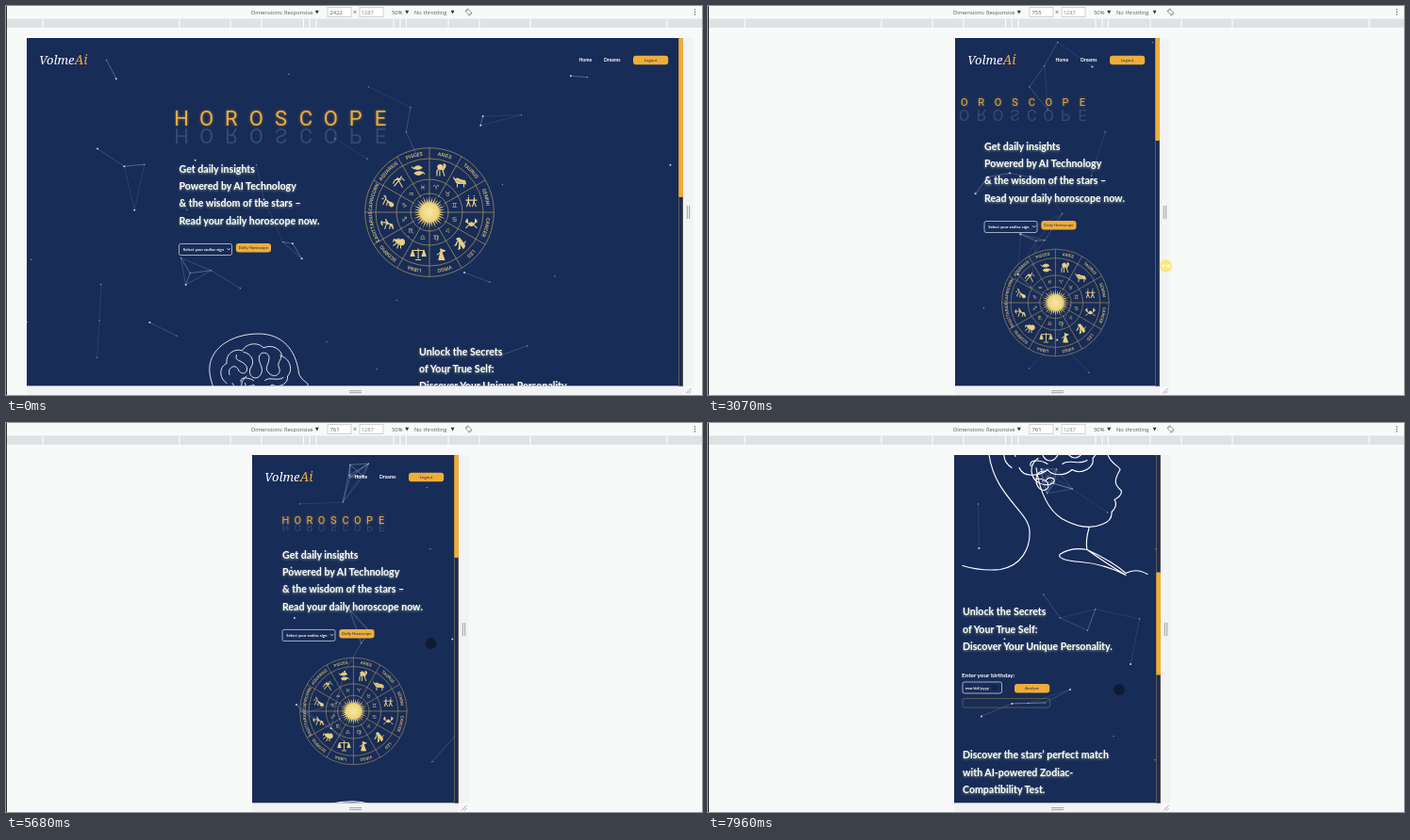
An HTML page that plays this animation: 738x413 px, repeating every 8000 ms.

```html
<!DOCTYPE html>
<html lang="en">
<head>
<meta charset="utf-8">
<title>Responsive horoscope page</title>
<style>
html, body { margin: 0; width: 100%; height: 100%; overflow: hidden; background: #f8faf9; }
svg { display: block; width: 738px; height: 413px; }
text { font-family: Lato, sans-serif; white-space: pre; }
.ui text { font-family: "Open Sans", sans-serif; fill: #55595e; }
.caps { font-family: Roboto, sans-serif; }
.glow { filter: drop-shadow(.6px 1.2px 1.1px rgba(225, 240, 170, .55)); }
.gold { filter: drop-shadow(0 0 1.5px rgba(240, 173, 53, .5)); }
.line { fill: none; stroke: #fff; stroke-linecap: round; stroke-linejoin: round; }
</style>
</head>
<body>
<svg id="stage" viewBox="0 0 738 413"></svg>
<script>
const LOOP = 8000, STEP = LOOP / 120, SCALE = 0.2874, MID = 370.4, TOP = 34, TALL = 369.6;
const NAVY = '#182c58', GOLD = '#efad38';

const lerp = (a, b, k) => a + (b - a) * k;
const clamp = v => Math.max(0, Math.min(1, v));
const range = (n, f) => Array.from({ length: n }, (_, i) => f(i));

// Piecewise linear track through [time, value] pairs
const track = (...keys) => t => {
  const i = keys.findIndex(k => k[0] > t);
  if (i === 0) return keys[0][1];
  if (i < 0) return keys[keys.length - 1][1];
  const [a, b] = [keys[i - 1], keys[i]];
  return lerp(a[1], b[1], (t - a[0]) / (b[0] - a[0]));
};

const width = track([0, 2422], [867, 2422], [1066, 2124], [1733, 1492], [2133, 803], [2600, 768], [3066, 755], [3400, 761]);
const lag = track([867, 0], [1066, 4.3], [1800, 3], [2133, 0]);
const scroll = track([6300, 0], [6400, 12], [6900, 200], [7400, 380], [7800, 423]);
const heroY = track([2600, 160], [3066, 149], [4866, 141.5], [6400, 138.5]);
const pitch = track([2600, 23], [3066, 17.9], [4866, 13.75], [6400, 11.75]);
const endX = track([3066, 397], [6400, 398.5]);
const titleSize = track([2600, 18], [3066, 11]);
const titleY = track([2600, 110], [3066, 102.5], [6400, 103]);
const echoY = track([2600, 128], [3066, 116.5], [4866, 113], [6400, 110]);
const echoSize = track([2600, 21], [3066, 17], [4866, 12], [6400, 10]);
const cursorX = track([350, 668], [750, 725], [867, 724], [1066, 659], [1733, 570], [2133, 477], [2600, 480], [3066, 485.5], [3500, 485.5], [4250, 479.5], [5200, 479.5], [5900, 436]);
const cursorY = track([350, 285], [750, 224], [1066, 235], [2133, 275], [3066, 276], [3500, 274], [4250, 136], [5200, 136], [5900, 283]);

const text = (x, y, s, size, more = '') =>
  `<text x="${x}" y="${y + size * 0.35}" font-size="${size}" ${more}>${s}</text>`;
const bold = (x, y, s, size, more = '') => text(x, y, s, size, 'font-weight="700" fill="#fff" ' + more);
const lines = (rows, y = 0) => rows.map((s, i) => bold(0, y + i * 18.35, s, 10.6)).join('');
const button = (x, y, label, size = 4.4) =>
  `<rect x="${x}" y="${y}" width="37.2" height="9.5" rx="3" fill="${GOLD}"/>` +
  text(x + 18.6, y + 4.7, label, size, `text-anchor="middle" fill="${NAVY}"`);
const field = (x, y, w, h, color) =>
  `<rect x="${x}" y="${y}" width="${w}" height="${h}" rx="2" fill="none" stroke="${color}" stroke-width=".7"/>`;
const caret = x => `<path d="M${x} 4.8h4l-2 3.6z" fill="#333"/>`;

const SIGNS = 'ARIES TAURUS GEMINI CANCER LEO VIRGO LIBRA SCORPIO SAGITTARIUS CAPRICORN AQUARIUS PISCES'.split(' ');
const FIGURES = [
  'M-4 6V1Q-4-1-1-1H2Q3-5 0-6Q-4-6-3-3M-1 0V6M2-1L4 6M2 1L5-4Q6-6 3-7',
  'M-6-2Q-3-5 0-2L5-1L6 3M-5-2Q-5 2 0 2H4M-3 2V6M4 2V6M-6-2L-7-5',
  'M-3-4V1L-5 6M-3 1L-1 6M-6-1H0M3-4V1L1 6M3 1L5 6M0-1H6M-3-6v1M3-6v1',
  'M-3 1Q0-3 3 1Q0 4-3 1M-3 0L-6-2L-4-5M3 0L6-2L4-5M-3 2L-6 5M3 2L6 5',
  'M-4-4Q-1-7 1-3L4 1Q6 4 3 6M-3-2L-4 2L-6 3M-1-2L0 6L-2 7M4 1L6-2',
  'M0-6V-2L-2 6H4L1-2L5-4M0-2L-4 1',
  'M0-6V5M-3 6H3M-6-4H6M-6-4L-8 2H-4ZM6-4L4 2H8Z',
  'M-5-4L-2 0L2 2Q6 3 6-1Q6-4 3-4M-5-4L-6-1M-2 0L-6 3M0 1L-2 6M2 2V6M-2 0L0-5',
  'M-2-5L-1 0L5 1L6 6M-1 0L-3 6M3 1L2 6M-6-3Q-8 0-5 2M-6-1H0',
  'M-4-6Q-1-5-2-2L2 1Q7 2 6 5Q3 7 2 4M-2-2L-5 4M-4-3L-6-2M0 0L-1 5',
  'M3-6L0-1L-5 5M0-1L4 6M3-4L6-1M-2-4L2-2L-4-2L-6 2',
  'M-5-2Q-1-7 4-3Q1 0-5-2L-7-4M5 2Q1 7-4 3Q-1 0 5 2L7 4'
];

function wheel() {
  const polar = (deg, r) => [Math.sin(deg * Math.PI / 180) * r, -Math.cos(deg * Math.PI / 180) * r].map(v => +v.toFixed(2));
  const rings = [68.3, 57, 35, 20].map(r => `<circle r="${r}"/>`).join('');
  const spokes = range(12, i => `<path d="M${polar(i * 30, 18)}L${polar(i * 30, 68.3)}"/>`).join('');
  const rays = range(64, i => polar(i * 360 / 64, i % 2 ? 10 : 18.5 - i % 4)).join(' ');
  const cells = SIGNS.map((name, i) => {
    const a = i * 30 + 15;
    return `<g transform="rotate(${a})"><text class="caps" font-size="5.3" font-weight="500" fill="#dcc47a" text-anchor="middle"><textPath href="#arc" startOffset="50%">${name}</textPath></text></g>
      <path transform="translate(${polar(a, 46)})" d="${FIGURES[i]}" fill="#e8cf83" stroke="#e8cf83" stroke-width="1.1" stroke-linejoin="round"/>
      <text transform="translate(${polar(a, 27.5)})" y="2.4" font-size="7" fill="#d9c47c" text-anchor="middle" style="font-family:'DejaVu Sans',sans-serif">${String.fromCharCode(0x2648 + i)}\uFE0E</text>`;
  }).join('');
  return `<path id="arc" d="M${polar(-20, 60.8)}A60.8 60.8 0 0 1 ${polar(20, 60.8)}" fill="none"/>
    <g fill="none" stroke="#a08f5c" stroke-width=".8">${rings}${spokes}</g>${cells}
    <polygon points="${rays}" fill="url(#sun)"/>`;
}

const HEAD = `<path d="M0 174Q20 180 40 178C62 174 72 156 71 137C70 116 34 100 28 56C24 22 58 0 97 0C130 0 150 22 154 56C157 66 166 68 167 72C160 84 161 88 168 94Q170 99 161 104Q165 110 158 117Q159 126 148 130Q130 138 105 124Q84 110 78 70"/>
  <path d="M134 134Q130 148 132 157Q150 170 173 184Q150 172 125 170Q100 168 103 162Q115 154 132 157Q160 170 173 182Q184 176 196 183"/>
  <path d="M52 70C40 62 42 46 52 42C50 28 64 20 74 24C80 12 98 12 104 20C116 14 130 22 130 32C142 36 146 52 138 60C140 70 126 78 116 72C108 80 94 78 90 72C80 80 64 80 60 70"/>
  <path d="M56 58C52 48 64 42 68 50C72 60 84 56 80 46C74 36 62 40 66 30M76 26C88 28 92 40 86 48C80 60 94 68 100 58C106 48 96 42 98 32C100 24 112 26 112 34C112 44 104 48 112 56C120 64 130 56 126 48C122 40 132 36 128 30M72 68C70 60 84 62 90 66M106 66C112 60 124 68 132 62"/>
  <path d="M88 74C76 70 74 92 86 94C96 92 90 80 78 82M80 60C66 70 74 90 92 88C104 84 92 76 88 84"/>`;

document.getElementById('stage').innerHTML = `
  <defs>
    <clipPath id="clip"><rect id="clipBox" y="${TOP}" height="${TALL}"/></clipPath>
    <radialGradient id="sun"><stop stop-color="#f8e7a8"/><stop offset=".45" stop-color="#f0d681"/><stop offset="1" stop-color="#cfa949"/></radialGradient>
  </defs>
  <rect width="738" height="413" fill="#f8faf9"/>
  <g class="ui">
    <rect x="1" y="13.5" width="737" height="9.5" fill="#dfe1e5"/>
    <path d="${[331, 186, 132, 99, 54.5, 48, 41].map(d => `M${370 - d} 13.5v9.5M${370 + d} 13.5v9.5`).join('')}" stroke="#fff"/>
    ${text(260, 6.6, 'Dimensions: Responsive', 5.8)}${caret(327.8)}
    <g fill="#fff" stroke="#c4c7ca" stroke-width=".8"><rect x="341" y="1.5" width="25" height="10"/><rect x="375" y="1.5" width="25" height="10"/></g>
    ${text(343.5, 6.6, '', 5.9, 'id="wide"')}${text(368, 6.6, '×', 7)}${text(376.5, 6.6, '1287', 5.9, 'opacity=".7"')}
    ${text(409, 6.6, '50%', 5.8)}${caret(423.2)}${text(433, 6.6, 'No throttling', 5.8)}${caret(471.6)}
    <g fill="none" stroke="#777" stroke-width=".7"><rect x="488.7" y="4" width="3.6" height="5" rx=".6" transform="rotate(-45 490.5 6.5)"/><path d="M487.2 6.2A3.3 3.3 0 0 1 491 3.2M493.8 6.8A3.3 3.3 0 0 1 490 9.8"/></g>
    <path d="M730.5 4h0M730.5 6.5h0M730.5 9h0" stroke="#555" stroke-width="1.3" stroke-linecap="round"/>
  </g>
  <rect id="side" y="${TOP}" width="10.5" height="${TALL}" fill="#f2f3f4"/>
  <rect id="foot" y="${TOP + TALL}" height="9.4" fill="#f2f3f4"/>
  <path d="M364 408.6h13M364 410.6h13" stroke="#9a9da0" stroke-width=".9"/>
  <path id="grip" d="M4.3 212v14M6.7 212v14M3 411.5l5.5-5.5M6 411.5l2.5-2.5" stroke="#929598" stroke-width=".9"/>
  <g clip-path="url(#clip)">
    <rect id="page" y="${TOP}" height="${TALL}" fill="${NAVY}"/>
    <g id="sky" fill="none" stroke="#cdd6e4">${[.18, .34, .55].map(o => `<path opacity="${o}" stroke-width=".6"/>`).join('')}<path stroke-width="1.3" stroke-linecap="round" opacity=".75"/><path stroke-width="2" stroke-linecap="round"/></g>
    <g id="body">
      <g id="logo"><text y="62.3" font-size="13" font-style="italic" fill="#fff" style="font-family:'Noto Serif',serif">Volme<tspan fill="${GOLD}" font-size="14">Ai</tspan></text></g>
      <g id="nav">${bold(-110.5, 57.6, 'Home', 5.1)}${bold(-84, 57.6, 'Dreams', 5.1)}${button(-53, 52.8, 'Logout')}</g>
      <text id="echo" class="caps" text-anchor="middle" fill="#8fa0b8" opacity=".25">HOROSCOPE</text>
      <text id="title" class="caps gold" text-anchor="middle" fill="${GOLD}">HOROSCOPE</text>
      <g id="hero">
        <g id="full" class="glow">${lines(['Get daily insights', 'Powered by AI Technology', '&amp; the wisdom of the stars –', 'Read your daily horoscope now.'])}</g>
        <g id="wrapped" class="glow">${lines(['Get daily insights', 'Powered by AI', 'Technology', '&amp; the wisdom of the', 'stars –', 'Read your daily', 'horoscope now.'])}</g>
        <g id="form">${field(0, 79.5, 56, 12, '#dfe4ec')}${bold(4.3, 85.3, 'Select your zodiac sign', 4.3)}
          <path class="line" stroke-width=".8" d="M51.3 84.6l1.3 1.3l1.3-1.3"/>${button(60.3, 79, 'Daily Horoscope', 4.3)}</g>
      </g>
      <g id="wheel">${wheel()}</g>
      <g id="head" class="line" stroke-width="1.15">${HEAD}</g>
      <g id="more">
        <g class="glow">${lines(['Unlock the Secrets', 'of Your True Self:', 'Discover Your Unique Personality.'])}${lines(['Discover the stars’ perfect match', 'with AI-powered Zodiac-', 'Compatibility Test.'], 152)}</g>
        ${bold(-1, 67, 'Enter your birthday:', 6.4)}${field(0, 74.5, 41.5, 12, '#dfe4ec')}${bold(3, 80.5, 'mm/dd/yyyy', 4.3)}
        <rect x="32" y="78.5" width="3.4" height="3.6" fill="none" stroke="#0d1a36" stroke-width=".8"/>
        ${button(55, 76.5, 'Analyze')}${field(0, 92, 92.5, 9.6, '#726f4c')}
      </g>
    </g>
    <g id="bar"><rect x="-4.7" y="${TOP}" width="4.7" height="370" fill="${NAVY}"/><path d="M-4.5 34v370M-.3 34v370" stroke="#8f7d50" stroke-width=".6"/><rect id="thumb" x="-4.7" width="4.7" rx="1.2" fill="${GOLD}"/></g>
  </g>
  <g id="cursor"><circle id="spot"/><path id="arrows" d="M-4 0h8M-2.4-1.6L-4 0l1.6 1.6M2.4-1.6L4 0L2.4 1.6" fill="none" stroke="#fff" stroke-width="1.1"/></g>
  <rect width="1" height="413" fill="#2b2b2b"/>`;

const el = {};
document.querySelectorAll('[id]').forEach(n => el[n.id] = n);
const set = (n, attrs) => { for (const k in attrs) n.setAttribute(k, attrs[k]); };
const move = (n, x, y = 0, s = 1) => n.setAttribute('transform', `translate(${x.toFixed(2)} ${y.toFixed(2)}) scale(${s})`);
const show = (n, on) => { n.style.display = on ? '' : 'none'; };

let seed = 29;
const rand = () => (seed = (seed * 16807) % 2147483647) / 2147483647;
const stars = range(50, () => ({ u: rand(), v: rand(), dx: (rand() - .5) * 24, dy: (rand() - .5) * 24, big: rand() > .65 }));
const wrap = (v, n) => ((v % n) + n) % n;

function drawSky(t, left, w) {
  const pts = stars.slice(0, Math.round(14 + w * .05)).map(s => ({
    x: left + wrap(s.u * w + s.dx * t / 1000, w),
    y: TOP + wrap(s.v * 370 + s.dy * t / 1000, 370),
    big: s.big
  }));
  const d = ['', '', '', '', ''], reach = 50;
  pts.forEach((p, i) => {
    const at = `M${p.x.toFixed(1)} ${p.y.toFixed(1)}`;
    d[p.big ? 4 : 3] += at + 'h0';
    for (const q of pts.slice(i + 1)) {
      const near = 1 - Math.hypot(p.x - q.x, p.y - q.y) / reach;
      if (near > 0) d[Math.min(2, Math.floor(near * 4))] += `${at}L${q.x.toFixed(1)} ${q.y.toFixed(1)}`;
    }
  });
  d.forEach((path, i) => el.sky.children[i].setAttribute('d', path));
}

function layout(t, w, left) {
  if (w <= 768) {
    const y = heroY(t);
    return {
      x: 293, y, wrapped: false, cx: 368.4, cy: y + 166, r: 57, headX: 270, headY: y + 262, headS: 1,
      moreX: 270, moreY: 623.5, end: endX(t), pitch: pitch(t), size: titleSize(t), titleY: titleY(t),
      echoY: echoY(t), echoSize: echoSize(t), thumb: 109
    };
  }
  const k = clamp((1340 - w) / 537), m = clamp((w - 2124) / 298);
  return {
    x: Math.max(181.5 + 2 * m, left + .3), y: lerp(173, 170, k), wrapped: k > .6,
    cx: lerp(446.5 + 2.5 * m, 415.5, k), cy: lerp(219, 170, k), r: lerp(68.5, 22, k),
    headX: lerp(192 + 3 * m, 229, k), headY: lerp(348, 378, k), headS: .75,
    moreX: lerp(421 + 17 * m, 391.5, k), moreY: lerp(367, 397, k),
    end: lerp(394.7 + 2.3 * m, 365, k), pitch: lerp(26.35, 24, k),
    size: 22, titleY: lerp(119.5, 117.5, k), echoY: lerp(138, 136, k), echoSize: 22, thumb: lerp(169, 161, k)
  };
}

function render(t) {
  const w = width(t), half = w * SCALE / 2;
  const left = Math.round(MID - half), right = Math.round(MID + half), pw = right - left;
  const inner = right - lag(t), s = scroll(t), g = layout(t, w, left);
  el.wide.textContent = Math.round(w);
  for (const n of [el.clipBox, el.page, el.foot]) set(n, { x: left, width: pw });
  set(el.side, { x: right });
  move(el.grip, right);
  drawSky(t, left, pw);

  move(el.body, 0, -s);
  move(el.logo, left + 13);
  move(el.nav, inner);
  const xs = range(9, i => (g.end - (8 - i) * g.pitch).toFixed(2)).join(' ');
  set(el.title, { x: xs, y: g.titleY + g.size * .36, 'font-size': g.size });
  set(el.echo, { x: xs, y: g.echoSize * .36, 'font-size': g.echoSize, transform: `translate(0 ${g.echoY}) scale(1 -1)` });
  move(el.hero, g.x, g.y);
  show(el.full, !g.wrapped);
  show(el.wrapped, g.wrapped);
  move(el.form, 0, g.wrapped ? 55 : 0);
  move(el.wheel, g.cx, g.cy, g.r / 68.5);
  move(el.head, g.headX, g.headY, g.headS);
  move(el.more, g.moreX, g.moreY);
  move(el.bar, inner);
  set(el.thumb, { y: TOP + s * g.thumb / 370, height: g.thumb });

  const drag = t >= 867 && t < 3450;
  show(el.cursor, t > 350);
  show(el.arrows, drag);
  move(el.cursor, cursorX(t), cursorY(t));
  set(el.spot, drag ? { r: 6.8, fill: '#ffe11a', opacity: .55 } : { r: 5.9, fill: '#0a0f1a', opacity: .55 });
}

const start = performance.now();
function tick() {
  const t = (performance.now() - start) % LOOP;
  render(Math.floor(t / STEP) * STEP);
  requestAnimationFrame(tick);
}
tick();
</script>
</body>
</html>
```
